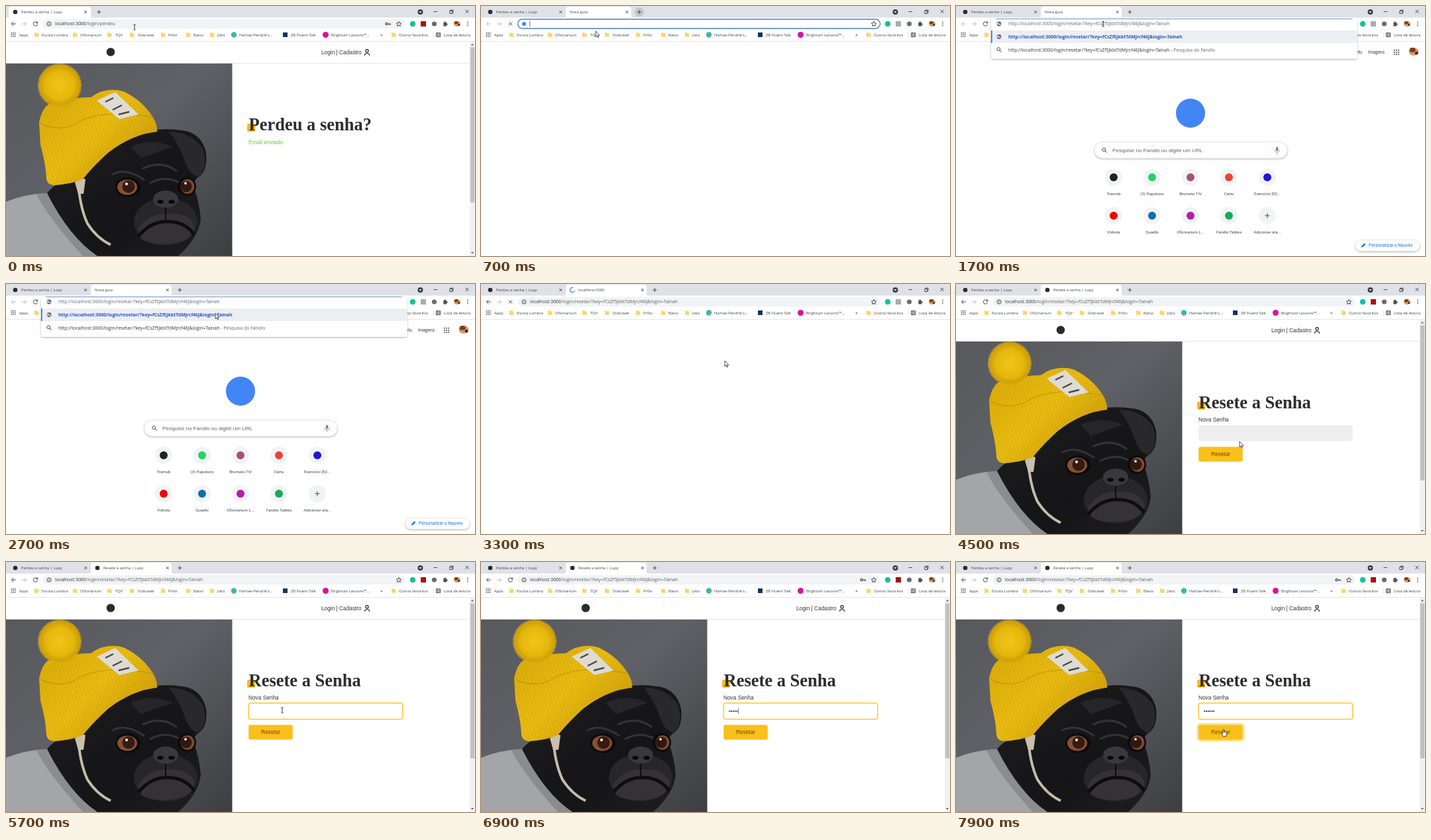
Recreate the animation shown at these times as an HTML page. Size 708 by 378 pixels, loop 8000 ms.

```html
<!DOCTYPE html>
<html lang="pt-BR">
<head>
<meta charset="utf-8">
<title>Resete a senha</title>
<style>
html, body { margin: 0; width: 100%; height: 100%; overflow: hidden; background: #fff; }
svg { display: block; width: 708px; height: 378px; }
text { white-space: pre; }
.ui { font: 5.85px 'Open Sans', 'Noto Sans', sans-serif; fill: #3c4043; }
.url { font: 6.94px 'Open Sans', 'Noto Sans', sans-serif; fill: #5f6368; }
.site { font: 8.3px 'Liberation Sans', Arial, sans-serif; fill: #333; }
.title { font: bold 26.5px 'Liberation Serif', serif; fill: #2d2d2d; }
.fallback { font: bold 24.4px 'Noto Serif', serif; }
.label { font: 6.2px Roboto, sans-serif; fill: #3c4043; text-anchor: middle; }
.line { fill: none; stroke: #45494d; stroke-width: 1; }
</style>
</head>
<body>
<svg id="stage" viewBox="0 0 708 378" xmlns="http://www.w3.org/2000/svg"></svg>
<script>
const LOOP = 8000;
const stage = document.getElementById('stage');

// Markup helpers
const attrs = o => Object.entries(o).map(([k, v]) => ` ${k}="${v}"`).join('');
const rect = (x, y, w, h, fill, o = {}) =>
  `<rect x="${x}" y="${y}" width="${w}" height="${h}" fill="${fill}"${attrs(o)}/>`;
const dot = (x, y, r, fill, o = {}) => `<circle cx="${x}" cy="${y}" r="${r}" fill="${fill}"${attrs(o)}/>`;
const oval = (x, y, rx, ry, fill, o = {}) =>
  `<ellipse cx="${x}" cy="${y}" rx="${rx}" ry="${ry}" fill="${fill}"${attrs(o)}/>`;
const path = (d, fill, o = {}) => `<path d="${d}" fill="${fill}"${attrs(o)}/>`;
const line = (d, o = {}) => `<path class="line" d="${d}"${attrs(o)}/>`;
const text = (x, y, cls, s, o = {}) => `<text x="${x}" y="${y}" class="${cls}"${attrs(o)}>${s}</text>`;
const group = (id, ...parts) => `<g id="${id}">${parts.join('')}</g>`;

const USER = 'Tainah';
const SITE = 'Lupy';
const HOST = 'localhost:3000';
const RESET = `/login/resetar/?key=fCsZf5JkbtTdMjrcf46J&amp;login=${USER}`;
const FULL = `http://${HOST}${RESET}`;

const cross = (x, y, r) => line(`M${x - r} ${y - r}l${2 * r} ${2 * r}m0 ${-2 * r}l${-2 * r} ${2 * r}`);
const lens = (x, y) => line(`M${x + 1} ${y + 1}l2.8 2.8`) + dot(x - .8, y - .8, 2.4, 'none', { class: 'line' });
const globe = (x, y) => dot(x, y, 3.4, '#5f6368') +
  path(`M${x - 2} ${y - 2}l2 1-1 2-2 0zM${x + .5} ${y}l2 0-1 2.2-1.4-.6z`, '#fff');
const folder = (x, y) => path(`M${x - 3} ${y - 3.2}h2.6l1 1h2.9v5.4h-6.5z`, '#f9d66b');
const grid = (x, y, step, size) => Array.from({ length: 9 }, (_, i) =>
  rect(x + (i % 3 - 1) * step - size / 2, y + (Math.floor(i / 3) - 1) * step - size / 2, size, size, '#5f6368')).join('');
const avatar = (x, y, r) => oval(x, y, r, r * .8, '#d59a63') +
  oval(x - r * .25, y - r * .35, r * .6, r * .45, '#7d3c1c') + dot(x + r * .55, y + r * .3, r * .3, '#3a2218');

function defs() {
  return `<defs>
    <linearGradient id="wall" x2="1" y2="1"><stop stop-color="#58595d"/><stop offset=".45" stop-color="#606166"/><stop offset="1" stop-color="#3d3e42"/></linearGradient>
    <radialGradient id="wool"><stop stop-color="#efc41a"/><stop offset=".7" stop-color="#e5b70c"/><stop offset="1" stop-color="#c99a06"/></radialGradient>
    <linearGradient id="knit" x2="1" y2=".8"><stop stop-color="#d9aa08"/><stop offset=".5" stop-color="#ebbe12"/><stop offset="1" stop-color="#c99706"/></linearGradient>
    <linearGradient id="fur" x2="1" y2="1"><stop stop-color="#1d1d20"/><stop offset=".6" stop-color="#151517"/><stop offset="1" stop-color="#1e1d1f"/></linearGradient>
    <pattern id="rib" width="5" height="5" patternUnits="userSpaceOnUse" patternTransform="rotate(-18)"><path d="M0 0V3.6M2.5 1.5V5" stroke="#a97d00" stroke-width=".9" opacity=".45"/></pattern>
    <clipPath id="frame"><rect x="0" y="87" width="341.5" height="291"/></clipPath>
    <filter id="lift" x="-10%" y="-30%" width="120%" height="180%"><feDropShadow dx="0" dy="1" stdDeviation="1.5" flood-opacity=".32"/></filter>
  </defs>`;
}

function photo() {
  const hat = 'M50 176Q55 152 67 147Q102 138 128 138Q150 122 177 129Q205 142 221 167Q229 180 228 190Q190 194 154 222Q130 244 116 262Q96 270 72 271Q62 270 61 261Q60 238 52 210Z';
  return `<g id="photo" clip-path="url(#frame)">` + [
    rect(0, 87, 342, 291, 'url(#wall)'),
    path('M0 296Q30 284 61 283Q75 300 90 325Q115 358 150 378H0Z', '#a4a5a8'),
    path('M46 285Q65 322 116 378H148Q98 346 66 282Z', '#8b8c90'),
    path('M62 283Q78 262 116 256Q150 205 228 187Q252 185 272 189Q296 195 302 222Q305 250 290 259Q284 263 283 272Q292 296 294 322Q291 350 260 378H138Q96 350 62 283Z', 'url(#fur)'),
    path('M246 190Q279 190 297 215Q307 244 290 258Q276 254 270 235Q264 214 246 190Z', '#29292c'),
    path('M188 213Q220 198 252 213Q230 220 204 230Z', '#26262a'),
    path('M160 255Q180 243 209 263M206 246Q235 232 258 250M217 268Q240 255 261 267', 'none', { stroke: '#333338', 'stroke-width': 3 }),
    oval(241, 326, 48, 36, '#272628'),
    path('M199 337Q215 314 241 314Q275 311 285 333Q282 354 257 358Q222 364 204 352Z', '#353235'),
    path('M200 348Q218 326 242 326Q270 325 284 346', 'none', { stroke: '#0d0c0e', 'stroke-width': 5 }),
    path('M241 304V326', 'none', { stroke: '#0d0c0e', 'stroke-width': 2 }),
    oval(241, 292, 19, 13, '#38383d'), oval(233, 296, 5, 3, '#09090a'), oval(250, 296, 5, 3, '#09090a'),
    oval(184, 274, 19, 15, '#0b0b0c'), oval(183, 274, 15, 11.5, '#885033'), dot(185, 273, 9.5, '#351b12'), dot(182, 269, 2.2, '#dbe3eb'),
    oval(273, 273, 14, 14, '#0b0b0c'), oval(274, 273, 10.5, 11, '#7d4a31'), dot(272, 273, 8.5, '#301810'), dot(271, 268, 2, '#dbe3eb'),
    path('M109 264Q111 303 123 329Q137 351 158 361', 'none', { stroke: '#c5bca9', 'stroke-width': 4 }),
    path('M104 267Q111 258 120 262L117 284H109Z', '#cac0ac'),
    path(hat, 'url(#knit)'), path(hat, 'url(#rib)'),
    path('M51 177Q76 190 102 180Q140 154 220 168', 'none', { stroke: '#b58a06', 'stroke-width': 1.5, opacity: .55 }),
    dot(81, 120, 31, 'url(#wool)', { stroke: '#d6a80b', 'stroke-width': 4, 'stroke-dasharray': '2 1' }),
    path('M137 143L165 130L200 164L171 171Z', '#dedbd5'),
    path('M150 145l12-6M161 157l14-7M170 164l16-4', 'none', { stroke: '#4b4845', 'stroke-width': 2.5 })
  ].join('') + '</g>';
}

function newTabPage() {
  const names = ['Tramub', '(3) Papoluno', 'Brumelo TiV', 'Cartu', 'Exercício [52...',
    'Vidrola', 'Quadlo', 'Oficinarium L...', 'Fandlo Tables', 'Adicionar ata...'];
  const tints = ['#202124', '#25d366', '#a35470', '#ea4335', '#2014d8', '#f00000', '#0e6fab', '#b71ca4', '#18a85a'];
  const links = names.map((name, i) => {
    const x = 238 + i % 5 * 58, y = i < 5 ? 259 : 317;
    const icon = i < 9 ? dot(x, y, 6, tints[i]) : line(`M${x - 3.7} ${y}h7.4m-3.7-3.7v7.4`, { 'stroke-width': 1.3 });
    return dot(x, y, 13, '#f1f3f4') + icon + text(x, y + 27, 'label', name);
  });
  const top = { style: 'font-size:6.5px' };
  return group('ntp',
    dot(354, 162, 22, '#4285f4'),
    rect(209, 206, 291, 24, '#fff', { rx: 12, stroke: '#e1e3e6', 'stroke-width': .7, filter: 'url(#lift)' }),
    lens(224, 218), text(236, 221, 'site', 'Pesquise no Fandlo ou digite um URL', { style: 'font-size:8.1px;fill:#5f6368' }),
    rect(483, 213, 3.2, 6, '#4285f4', { rx: 1.6 }), line('M481 217q0 4 3.6 4t3.6-4m-3.6 4v2.2', { style: 'stroke:#ea8c35' }),
    text(597, 72, 'site', 'Cartu', top), text(622, 72, 'site', 'Imagens', top),
    grid(665, 70, 3.2, 1.9), avatar(691, 69, 7.5)
  ) + group('links', ...links,
    rect(603, 354, 97, 16.5, '#fff', { rx: 8.2, stroke: '#e3e5e8', 'stroke-width': .6, filter: 'url(#lift)' }),
    path('M612 365l.4-2.2 4.3-4.3 1.8 1.8-4.3 4.3z', '#1a73e8'),
    text(623, 364.3, 'label', 'Personalizar o Nauvex', { style: 'font-size:6.7px;fill:#1a73e8;text-anchor:start' }));
}

function sitePage() {
  return group('site',
    rect(0, 54, 708, 324, '#fff'),
    rect(0, 86, 700, 1, '#e6e6e6'),
    dot(158, 69.5, 6.3, '#2b2b2b'),
    text(476, 73, 'site', 'Login | Cadastro'),
    group('person', dot(545, 67.7, 2.1, '#fff', { class: 'line', style: 'stroke:#222;stroke-width:1.2' }),
      line('M541.6 75v-1q0-2.5 3.4-2.5t3.4 2.5v1', { style: 'stroke:#222;stroke-width:1.2' })),
    photo(),
    group('form',
      rect(364, 178, 12, 12, '#fb1', { rx: 2 }),
      text(366.5, 188, 'title', '', { id: 'heading' }),
      text(366, 209, 'site', 'Email enviado', { id: 'sent', style: 'fill:#7fd854;stroke:#7fd854;stroke-width:.2' }),
      group('fields',
        text(366, 208, 'site', 'Nova Senha'),
        rect(364.8, 212, 235.2, 27, '#fea', { rx: 4, id: 'glow' }),
        rect(366.3, 213.5, 232.4, 24, '#eee', { rx: 3, id: 'input', 'stroke-width': 1 }),
        group('dots', ...Array.from({ length: 6 }, (_, i) => dot(375.2 + 2.8 * i, 225.6, 1.05, '#222'))),
        rect(374, 221, .6, 9, '#222', { id: 'caret' }),
        rect(364.3, 244.5, 70.4, 25.8, '#fea', { rx: 4.5, id: 'halo', stroke: '#fb1', 'stroke-width': .7 }),
        rect(366.2, 246.3, 66.6, 22.2, '#fabf1b', { rx: 3 }),
        text(385, 260, 'site', 'Resetar', { style: 'fill:#764701' }))),
    rect(700, 54, 8, 324, '#f1f1f1'), rect(700.8, 62.5, 6.4, 234.5, '#c1c1c1'),
    path('M701.8 59.5h4.4l-2.2-2.4zM701.8 372h4.4l-2.2 2.4z', '#606060'));
}

function bookmarks() {
  const items = [[46, 54, 'Escola Lumbra'], [104, 112, 'Oficinarium'], [156, 165, 'TQV'], [190, 199, 'Dobravel'],
    [237, 245, 'Pr0vi'], [275, 283, 'Baixo'], [311, 319, 'Jobs'], [585, 593, 'Outros favoritos']];
  return grid(11, 43.3, 2.6, 1.6) + text(20, 45.8, 'ui', 'Apps') +
    items.map(([x, tx, s]) => folder(x, 43.5) + text(tx, 45.8, 'ui', s)).join('') +
    dot(344, 43.5, 4.2, '#3fb6a8') + text(352, 45.8, 'ui', 'Harlow-Pendrik\'s...') +
    rect(418, 40, 7, 7, '#12355b') + text(430, 45.8, 'ui', 'ZB Fluent Talk') +
    dot(482.5, 43.5, 4.5, '#d6139b') + text(491, 45.8, 'ui', 'Brightum Lessons™...') +
    text(565, 46, 'ui', '»', { style: 'font-size:7.5px' }) + rect(644.8, 39, .6, 9, '#d5d7da') +
    line('M649.5 40.7h6.2v5.8h-6.2zM651.4 40.7v5.8M652.5 42.6h2.5m-2.5 2h2.5') + text(661, 45.8, 'ui', 'Lista de leitura');
}

function browserBar() {
  return rect(0, 0, 708, 18, '#dee1e6') + rect(0, 17.5, 708, 35.5, '#fff') + rect(0, 53, 708, .8, '#dfe1e4') +
    path('', '#fff', { id: 'tab' }) +
    dot(14, 9, 3.3, '#2b2b2b') + text(23, 11, 'ui', `Perdeu a senha | ${SITE}`) + cross(120.2, 9, 1.9) +
    group('tab2', dot(138, 9, 3.3, '#2b2b2b', { id: 'icon2' }),
      line('M138 5.5a3.5 3.5 0 1 1-3.5 3.5', { id: 'spin', style: 'stroke:#3b78e7;stroke-width:1.2' }),
      text(134, 11, 'ui', '', { id: 'title2' }), `<g id="close2">${cross(0, 9, 1.9)}</g>`) +
    `<g id="plus">${dot(0, 9, 7, '#c3c6cb', { id: 'plusHover' })}${line('M-3 9h6m-3-3v6')}</g>` +
    dot(625.5, 9, 4, '#3b3e42') + path('M623.5 8h4l-2 2.4z', '#fff') +
    line('M645.5 8.5h5.5M669.8 7.5h4v4h-4zM671 7.5v-1.4h4v4h-1.2', { style: 'stroke:#222;stroke-width:.8' }) + cross(696, 8.3, 2.5) +
    line('M15 27H8.3m3.2-3.2L8.3 27l3.2 3.2', { id: 'back' }) +
    line('M23.8 27h6.7m-3.2-3.2l3.2 3.2-3.2 3.2', { style: 'stroke:#b9bcc0' }) +
    group('reload', line('M47 25a3.2 3.2 0 1 0 .6 2.7'), path('M48 23v3.2h-3.2z', '#45494d')) + group('stop', cross(44.5, 27, 2.6)) +
    rect(55.5, 20, 547, 14, '#f1f3f4', { rx: 7, id: 'omni', 'stroke-width': 1.3 }) +
    group('info', dot(65, 27, 3.1, 'none', { class: 'line', 'stroke-width': .8 }), line('M65 26.4v2.2m0-3.9v.8')) +
    group('engine', dot(65, 27, 3, '#4285f4')) +
    rect(73.5, 22.5, .7, 9, '#333', { id: 'omniCaret' }) +
    text(74, 29.4, 'url', '', { id: 'url' }) +
    group('key', dot(574.6, 27, 1.7, 'none', { class: 'line', style: 'stroke-width:1.2' }), line('M576.3 27h4v1.8m-1.8-1.8v1.5', { style: 'stroke-width:1.2' })) +
    path('M593 23.4l1.1 2.4 2.6.3-1.9 1.8.5 2.6-2.3-1.3-2.3 1.3.5-2.6-1.9-1.8 2.6-.3z', 'none', { class: 'line', 'stroke-width': .8 }) +
    dot(614, 27, 4.3, '#15c39a') + rect(626, 23, 8, 8, '#b30b00', { id: 'doc' }) +
    dot(646.5, 27, 3.6, '#6b6b6b') +
    rect(660.3, 25, 5, 5.5, '#505357', { rx: .6 }) + dot(662.8, 24.6, 1.2, '#505357') + dot(665.6, 27.6, 1.2, '#505357') +
    avatar(681, 27, 5) + [24.4, 27, 29.6].map(y => dot(697, y, .8, '#45494d')).join('') + bookmarks();
}

function dropdown() {
  return group('drop',
    rect(53, 20, 552.5, 60, '#fff', { rx: 2.5, filter: 'url(#lift)' }),
    rect(53, 37, 552.5, 19, '#eceef1'), rect(53, 37, 1.6, 19, '#1a73e8'),
    globe(65, 27), globe(65, 46.5), lens(65, 66),
    text(79, 29.4, 'url', FULL),
    text(79, 48.8, 'url', FULL, { style: 'font-weight:bold;fill:#2456c4' }),
    text(79, 68.5, 'url', `<tspan fill="#303236">${FULL}</tspan> - Pesquisa do Fandlo`));
}

function pointers() {
  const edge = { stroke: '#222', 'stroke-width': .8, 'stroke-linejoin': 'round' };
  return `<g id="pointer">` +
    group('arrow', path('M0 0V8.6L2 6.8 3.3 9.8 4.7 9.2 3.4 6.3H6Z', '#fff', edge)) +
    group('beam', line('M-1.7-4h1.3l.4.5.4-.5h1.3M0-3.5v7M-1.7 4h1.3l.4-.5.4.5h1.3', { style: 'stroke:#222;stroke-width:.9' })) +
    group('hand', path('M-1-4.5q1-1 1.8 0v3.5l3 .8q.9.4.8 1.4l-.7 4.3h-4.7l-2.4-3.8q-.1-1.5 2.2-.3z', '#fff', edge)) + '</g>';
}

stage.innerHTML = defs() + rect(0, 0, 708, 378, '#fff') + newTabPage() + sitePage() + browserBar() + dropdown() + pointers();

const el = {};
stage.querySelectorAll('[id]').forEach(n => el[n.id] = n);
const show = (id, on) => { el[id].style.display = on ? '' : 'none'; };
const set = (id, o) => { for (const k in o) el[id].setAttribute(k, o[k]); };
const write = (id, s) => { if (el[id].dataset.s !== s) { el[id].innerHTML = s; el[id].dataset.s = s; } };
const clamp = v => Math.max(0, Math.min(1, v));
const easeOut = p => 1 - (1 - p) * (1 - p);
const smooth = p => p * p * (3 - 2 * p);

// Pointer stops: time, x, y
const route = [[0, 194, 32], [100, 194, 32], [300, 140, 8], [580, 140, 8], [700, 173, 38], [1000, 200, 29], [1200, 200, 29],
  [1500, 222, 27], [2050, 222, 27], [2300, 316, 44], [2900, 316, 44], [3500, 386, 141], [3950, 386, 141], [4500, 428, 238],
  [4600, 428, 237], [5100, 417, 224], [7250, 417, 224], [7800, 404, 258], [8000, 404, 258]];
const keys = [5850, 6050, 6350, 6650, 6850, 7050];

function pointerAt(t) {
  const i = Math.max(1, route.findIndex(r => r[0] > t));
  const [a, b] = [route[i - 1], route[i]];
  const p = smooth(clamp((t - a[0]) / (b[0] - a[0])));
  return [a[1] + (b[1] - a[1]) * p, a[2] + (b[2] - a[2]) * p];
}

function drawTabs(t, opened, loaded) {
  const left = opened ? 128 : 4;
  const right = opened ? 128 + 122 * easeOut(clamp((t - 580) / 215)) : 128;
  set('tab', { d: `M${left - 3} 18q3 0 3-3V5q0-4 4-4H${Math.max(left + 4, right - 4)}q4 0 4 4V15q0 3 3 3z` });
  show('tab2', opened && right > 175);
  set('close2', { transform: `translate(${right - 6.3} 0)` });
  set('plus', { transform: `translate(${right + 12.3} 0)` });
  show('plusHover', t >= 230 && t < 780);
  show('icon2', loaded);
  const spinning = t >= 2850 && !loaded;
  show('spin', spinning);
  set('spin', { transform: `rotate(${t * .36 % 360} 138 9)` });
  set('title2', { x: spinning || loaded ? 147 : 134 });
  write('title2', loaded ? `Resete a senha | ${SITE}` : t >= 3600 ? SITE : t >= 2850 ? HOST : 'Nova guia');
}

function drawBar(t, opened, loaded) {
  const leaving = t >= 2850, blank = opened && !leaving;
  const busy = opened && t < 1200 || leaving && !loaded;
  show('stop', busy);
  show('reload', !busy);
  set('back', { style: `stroke:${blank ? '#b9bcc0' : '#45494d'}` });
  set('omni', { fill: blank ? '#fff' : '#f1f3f4', stroke: blank ? '#4a7fc4' : 'none' });
  set('doc', { fill: opened && !loaded ? '#a9abae' : '#b30b00' });
  show('info', !blank);
  show('engine', blank);
  show('omniCaret', blank);
  show('key', !opened || t >= 5900);
  write('url', blank ? '' : `<tspan fill="#303236">${HOST}</tspan>${opened ? RESET : '/login/perdeu'}`);
  show('drop', t >= 1700 && t < 2850);
}

function drawSite(t, opened, loaded) {
  const p = opened ? easeOut(clamp((t - 3750) / 300)) : 1;
  show('site', !opened || t >= 3600);
  show('photo', !opened || loaded);
  show('person', !opened || loaded);
  show('sent', !opened);
  show('fields', opened);
  set('form', { transform: `translate(${-10.4 * (1 - p)} 0)`, opacity: p });
  set('heading', { class: opened && !loaded ? 'title fallback' : 'title' });
  write('heading', opened ? 'Resete a Senha' : 'Perdeu a senha?');
}

function drawForm(t, y) {
  const active = t >= 4650;
  const typed = keys.filter(k => t >= k).length;
  show('glow', active);
  set('input', { fill: active ? '#fff' : '#eee', stroke: active ? '#fb1' : 'none' });
  [...el.dots.children].forEach((n, i) => { n.style.display = i < typed ? '' : 'none'; });
  set('caret', { x: 374 + 2.8 * typed });
  show('caret', t >= 5800 && t < 7350);
  show('halo', t > 7250 && y > 246);
}

function drawPointer(t, x, y) {
  const beam = t < 200 || t >= 900 && t < 2100 || t >= 4700 && t < 7250 || t >= 7250 && y < 238;
  const hand = t > 7250 && y > 246;
  set('pointer', { transform: `translate(${x} ${y})` });
  show('pointer', t < 5870 || t >= 7250);
  show('beam', beam);
  show('hand', hand);
  show('arrow', !beam && !hand);
}

function draw(t) {
  const opened = t >= 580, loaded = t >= 4100;
  const [x, y] = pointerAt(t);
  drawTabs(t, opened, loaded);
  drawBar(t, opened, loaded);
  show('ntp', t >= 900 && t < 3300);
  show('links', t >= 1200 && t < 3300);
  drawSite(t, opened, loaded);
  drawForm(t, y);
  drawPointer(t, x, y);
}

const start = performance.now();
function tick() {
  draw((performance.now() - start) % LOOP);
  requestAnimationFrame(tick);
}
tick();
</script>
</body>
</html>
```
